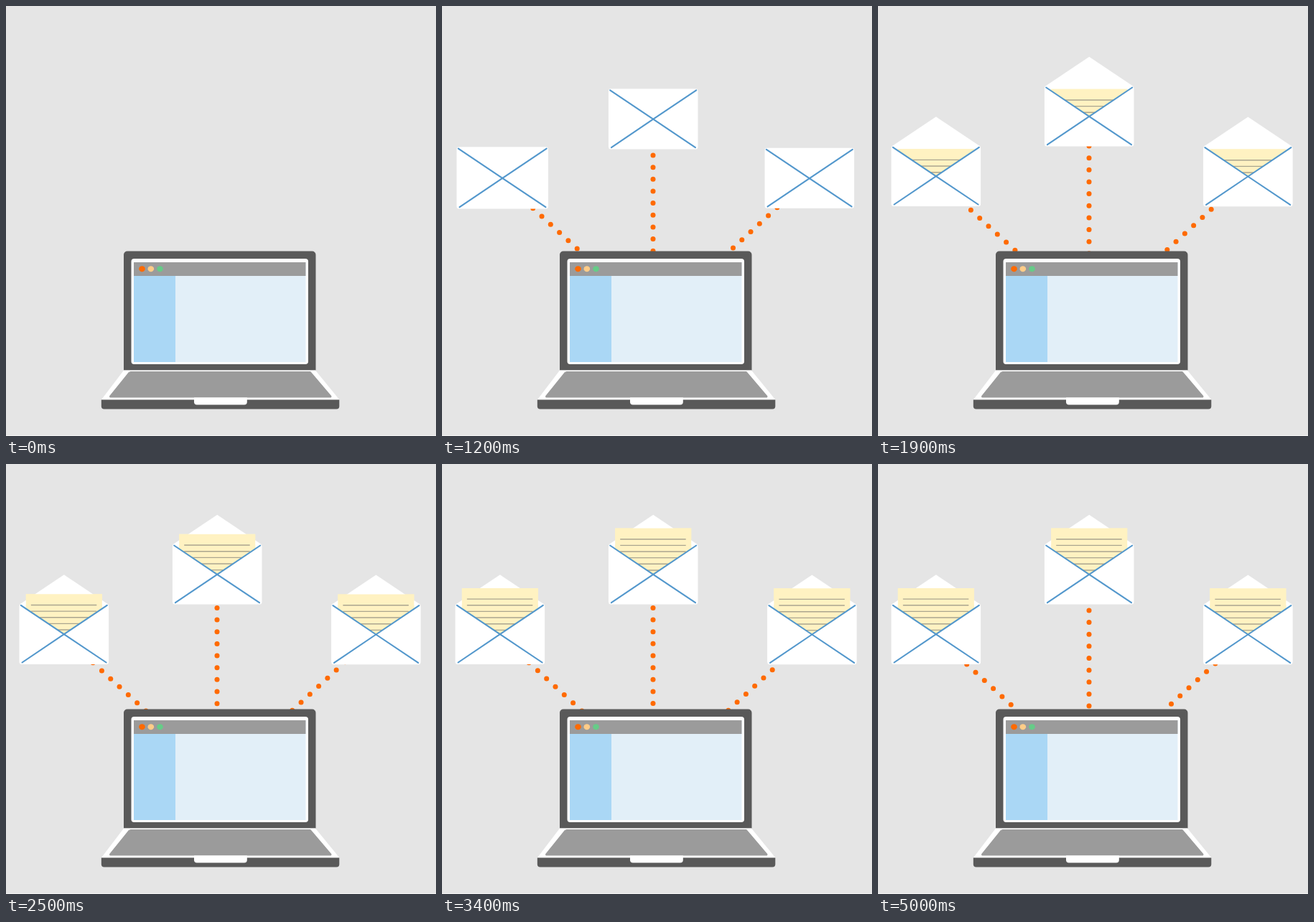
Animation of 599 by 599 pixels, one loop 5.05 s. Source, as an HTML page with a canvas:

```html
<!DOCTYPE html>
<html lang="en">
<head>
<meta charset="utf-8">
<title>Laptop sending letters</title>
<style>
  html, body { margin: 0; width: 100%; height: 100%; overflow: hidden; background: #e5e5e5; }
  canvas { display: block; width: 599px; height: 599px; }
</style>
</head>
<body>
<canvas id="stage" width="599" height="599"></canvas>
<script>
const ctx = document.getElementById('stage').getContext('2d');
const LOOP = 5050, STEP = 50;
const ORIGIN = { x: 294, y: 401 };
const GAP = 16.65, DOT_SPEED = 0.93 / STEP;

// x, y: resting centre; dot: a point on the dotted trail; dir: trail direction
const letters = [
  { x: 80.8, y: 237.2, extra: 0.024, dot: [139, 293], dir: [-0.739, -0.674] },
  { x: 294.2, y: 153.8, extra: 0, dot: [294, 208], dir: [0, -1] },
  { x: 515.4, y: 237.5, extra: 0, dot: [454.6, 292], dir: [0.737, -0.676] }
];

const clamp = v => Math.min(1, Math.max(0, v));
const span = (t, start, length) => clamp((t - start) / length);
const mix = (a, b, p) => a + (b - a) * p;
const smooth = p => (1 - Math.cos(Math.PI * p)) / 2;

// Same curve as the CSS "ease" keyword
function ease(p) {
  if (p <= 0 || p >= 1) return clamp(p);
  let lo = 0, hi = 1;
  for (let i = 0; i < 20; i++) {
    const u = (lo + hi) / 2;
    if (0.75 * u * (1 - u) + u ** 3 < p) lo = u; else hi = u;
  }
  const u = lo, v = 1 - u;
  return 0.3 * u * v * v + 3 * u * u * v + u ** 3;
}

function box(color, x, y, w, h, r = 0) {
  ctx.fillStyle = color;
  ctx.beginPath();
  ctx.roundRect(x, y, w, h, r);
  ctx.fill();
}

function trace(points) {
  ctx.beginPath();
  points.forEach(([x, y]) => ctx.lineTo(x, y));
}

function shape(color, ...points) {
  ctx.fillStyle = color;
  trace(points);
  ctx.closePath();
  ctx.fill();
}

function stroke(color, width, ...points) {
  ctx.strokeStyle = color;
  ctx.lineWidth = width;
  trace(points);
  ctx.stroke();
}

function disc(color, x, y, rx, ry = rx) {
  ctx.fillStyle = color;
  ctx.beginPath();
  ctx.ellipse(x, y, rx, ry, 0, 0, 7);
  ctx.fill();
}

function drawLaptop() {
  box('#595959', 164, 341.5, 267.5, 166, [5, 5, 0, 0]);
  box('#fff', 174.5, 352, 246.5, 147, 4);
  box('#e2eff8', 178, 357, 239.5, 139);
  box('#aad7f5', 178, 376, 58, 120);
  box('#9b9b9b', 178, 357, 239.5, 19);
  disc('#ff6a00', 189.5, 366.2, 4.3, 4);
  disc('#ffcc88', 201.8, 366.2, 4.3, 4);
  disc('#66cc88', 214.5, 366.2, 4.3, 4);

  shape('#fff', [164, 507.5], [431, 507.5], [464.5, 548.5], [132.8, 548.5]);
  ctx.lineJoin = 'round';
  const deck = [[172.5, 510.5], [423.5, 510.5], [452, 544], [145.5, 544]];
  shape('#9b9b9b', ...deck);
  stroke('#9b9b9b', 3, ...deck, deck[0]);
  box('#595959', 132.8, 548.5, 331.5, 13, [0, 0, 4, 4]);
  box('#fff', 262, 545.5, 73.8, 10, [0, 0, 4, 4]);
}

function drawTrail({ dot, dir }, top, t) {
  const shift = ((t - 1200) * DOT_SPEED) % GAP;
  for (let k = -11; k < 6; k++) {
    const d = shift + k * GAP;
    const y = dot[1] + dir[1] * d;
    if (y > top && y < 352) disc('#ff6a00', dot[0] + dir[0] * d, y, 3.5);
  }
}

function drawPaper(top) {
  ctx.save();
  trace([[-62, -100], [62, -100], [62, -42], [0, 0], [-62, -42]]);
  ctx.clip();
  box('#fff2c2', -53, top, 106, 80);
  for (let i = 0; i < 8; i++) {
    const y = top + 15.2 + i * 8.65;
    stroke('#aaa58f', 1.4, [-46, y], [45.5, y]);
  }
  ctx.restore();
}

function drawLetter(x, y, scale, flap, paperTop) {
  ctx.save();
  ctx.translate(x, y);
  ctx.scale(scale, scale);
  const apex = mix(0, -83, flap);
  box('#fff', -62.3, -42.3, 124.6, 84, 3.5);
  if (flap > 0) drawPaper(paperTop);
  // The raised flap sits behind the paper, the closed one in front of it
  if (apex < -42) {
    shape('#fff', [-62, -41.5], [0, apex], [62, -41.5]);
    drawPaper(paperTop);
  } else {
    shape('#fff', [-62, -42], [0, apex], [62, -42]);
  }
  ctx.lineCap = 'round';
  const blue = '#5297cc';
  stroke(blue, 2.1, [-60, -40.3], [0, 0], [60, -40.3]);
  stroke(blue, 2.1, [-58.3, 39.3], [0, 0], [58.8, 39.3]);
  ctx.lineCap = 'butt';
  ctx.restore();
}

function draw(t) {
  box('#e5e5e5', 0, 0, 599, 599);
  box('#f4f4f4', 0, 598, 599, 1);

  const out = t < 750 ? 0 : ease(span(t, 715, 580));
  const flap = smooth(span(t, 1330, 420));
  const paperTop = mix(-38, -64.3, ease(span(t, 2320, 450)));
  const settle = 1 - span(t, 1200, 100);
  const pose = letters.map(l => ({
    x: mix(ORIGIN.x, l.x, out),
    y: mix(ORIGIN.y, l.y, out),
    scale: Math.min(1, out / 0.98) * (1 + l.extra * settle)
  }));

  if (out) letters.forEach((l, i) => drawTrail(l, pose[i].y, t));
  drawLaptop();
  if (out) pose.forEach(p => drawLetter(p.x, p.y, p.scale, flap, paperTop));
}

const start = performance.now();
function tick() {
  const t = (performance.now() - start) % LOOP;
  draw(Math.floor(t / STEP) * STEP);
  requestAnimationFrame(tick);
}
tick();
</script>
</body>
</html>
```
